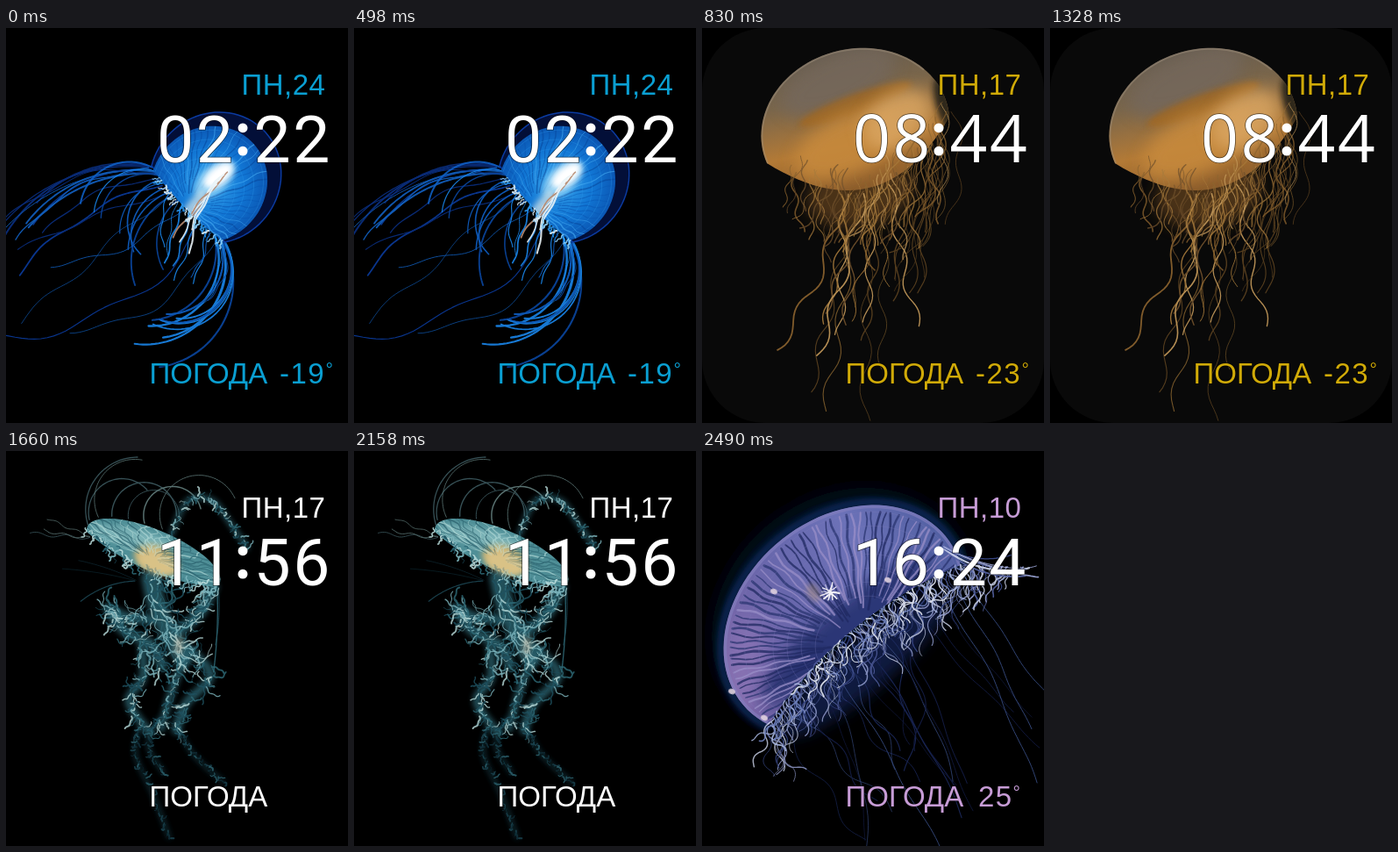
These frames come from a looping animation (390x450 px, 3320 ms). An HTML page:

```html
<!DOCTYPE html>
<html lang="ru">
<head>
<meta charset="utf-8">
<title>Watch faces</title>
<style>
html, body { margin: 0; width: 100%; height: 100%; overflow: hidden; background: #000; }
svg { display: block; width: 390px; height: 450px; }
text { stroke: #000; stroke-opacity: .6; stroke-width: 1.6px; paint-order: stroke; white-space: pre; }
.label { font: 33px "Liberation Sans", Arial, sans-serif; }
.degree { font-size: 21px; }
.time { font-size: 75px; letter-spacing: 2.5px; fill: #fff; }
.colon { font: 62px Roboto, sans-serif; fill: #fff; stroke: #fff; stroke-opacity: 1; stroke-width: 4px; text-anchor: middle; }
.lines { fill: none; stroke-linecap: round; stroke-linejoin: round; }
</style>
</head>
<body>
<svg id="stage" viewBox="0 0 390 450"></svg>
<script>
const STEP = 830, TAU = Math.PI * 2;
let seed = 11;
const rnd = () => (seed = (seed * 16807) % 2147483647) / 2147483647;
const jitter = a => (rnd() * 2 - 1) * a;
const mix = ([a, b], t) => a + (b - a) * t;
const pick = list => list[Math.floor(rnd() * list.length)];
const range = (n, f) => Array.from({ length: n }, (_, i) => f(n > 1 ? i / (n - 1) : .5));
const line = pts => 'M' + pts.map(p => p.map(v => v.toFixed(1)).join(' ')).join('L');
const stroke = (d, color, w) => `<path d="${d}" stroke="${color}" stroke-width="${w.toFixed(2)}"/>`;
const lines = (body, op = 1, extra = '') => `<g class="lines" opacity="${op}" ${extra}>${body}</g>`;
const fill = (d, color, extra = '') => `<path d="${d}" fill="${color}" ${extra}/>`;
const blob = (x, y, rx, ry, turn, color, op = 1, soft = 'soft') =>
  `<ellipse cx="${x}" cy="${y}" rx="${rx}" ry="${ry}" transform="rotate(${turn} ${x} ${y})" fill="${color}" opacity="${op}" filter="url(#${soft})"/>`;
const clip = (id, d, body) => `<clipPath id="${id}"><path d="${d}"/></clipPath><g clip-path="url(#${id})">${body}</g>`;

// Part of an ellipse standing on the chord x0,y0 - x1,y1; sag bends the open edge
function dome(x0, y0, x1, y1, bulge, depth, sag) {
  const len = Math.hypot(x1 - x0, y1 - y0), ux = (x1 - x0) / len, uy = (y1 - y0) / len;
  const mx = (x0 + x1) / 2, my = (y0 + y1) / 2;
  const s = Math.sqrt(1 - 1 / bulge ** 2), over = Math.asin(s);
  const rx = len / 2 * bulge, ry = depth / (1 + s);
  const place = (a, b) => [mx + ux * a + uy * b, my + uy * a - ux * b];
  const at = (p, k = 1) => {
    const a = Math.PI + over - p * (Math.PI + 2 * over);
    return place(k * rx * Math.cos(a), k * ry * (s + Math.sin(a)));
  };
  const rim = p => place(len * (p - .5), -sag * 4 * p * (1 - p));
  const path = line([...range(60, p => at(p)), ...range(30, p => rim(1 - p))]) + 'Z';
  return { at, rim, path };
}

// Ribs running from the crown edge toward the open edge
function ribs(bell, n, colors, w, [k0, k1], wave, op) {
  return lines(range(n, p => {
    const phase = rnd() * TAU, end = k1 + jitter(.1);
    const pts = range(14, t => bell.at(p + wave * Math.sin(t * 14 + phase), mix([k0, end], t)));
    return stroke(line(pts), pick(colors), w * (.6 + rnd() * .8));
  }).join(''), op);
}

const rings = (bell, n, color, w, op) => lines(range(n, k =>
  stroke(line(range(40, p => bell.at(p, .35 + .6 * k))), color, w)).join(''), op);

// A thread that walks ahead while its heading bends and swings (degrees)
function strand(x, y, turn, len, bend, curl = 0, waves = 2) {
  const phase = rnd() * TAU, step = len / 40;
  return line(range(41, t => {
    const a = (turn + bend * t + curl * Math.sin(waves * TAU * t + phase)) * TAU / 360;
    return [x += Math.cos(a) * step, y += Math.sin(a) * step];
  }));
}

// Threads along an edge; ranges blend from its first end to its last
function grow(edge, n, colors, { p = [0, 1], turn, len, bend = [0, 0], curl, waves, w = 1.3, loose = 8, lift = 0, op = .9 }) {
  return lines(range(n, q => {
    const [x, y] = edge(mix(p, q));
    const d = strand(x + jitter(2), y - rnd() * lift, mix(turn, q) + jitter(loose),
      mix(len, q) * (.75 + rnd() * .45), mix(bend, q) + jitter(loose * 2), curl, waves);
    return stroke(d, pick(colors), w * (.6 + rnd() * .8));
  }).join(''), op);
}

// Smooth walk through a few points
function through(pts) {
  return t => {
    const u = Math.min(t, .9999) * (pts.length - 1), i = Math.floor(u), f = u - i;
    const [a, b, c, d] = [-1, 0, 1, 2].map(k => pts[Math.max(0, Math.min(pts.length - 1, i + k))]);
    return [0, 1].map(j => b[j] + f * (c[j] - a[j]) / 2
      + f * f * (a[j] - 2.5 * b[j] + 2 * c[j] - d[j] / 2) + f ** 3 * (1.5 * (b[j] - c[j]) + (d[j] - a[j]) / 2));
  };
}

// Crumpled ribbon: a soft core with short curls around it
function frill(width, colors, ...pts) {
  const limb = through(pts), core = line(range(40, limb));
  const curls = range(pts.length * 11, t => {
    const [x, y] = limb(t), [x2, y2] = limb(t + .02);
    const along = Math.atan2(y2 - y, x2 - x) * 360 / TAU;
    const d = strand(x + jitter(width * .4), y + jitter(width * .3), along + jitter(70), width * (.7 + rnd()), jitter(170), 25);
    return stroke(d, pick(colors), .7 + rnd() * 1.3);
  }).join('');
  return lines(stroke(core, colors[0], width * .75), .75, 'filter="url(#soft)"') + lines(curls, .8);
}

function blueJelly() {
  const margin = dome(166, 157, 250, 244, 1.2, 120, 2), bell = dome(168, 162, 246, 242, 1.15, 103, 4);
  const blues = ['#0f5fc4', '#1a86ea', '#0a469f'], deep = ['#0b3b9c', '#0a2f80', '#1260c0'];
  return grow(margin.rim, 7, deep, { p: [0, .1], turn: [193, 185], len: [180, 190], bend: [-65, -55], w: 1.6, loose: 4 })
    + grow(margin.rim, 5, deep, { p: [.02, .3], turn: [188, 165], len: [170, 205], bend: [-70, -25], curl: 10 })
    + grow(margin.rim, 9, blues, { p: [.03, .4], turn: [195, 150], len: [105, 105], bend: [-130, -70], w: 1.5, loose: 14 })
    + grow(margin.rim, 4, deep, { p: [.3, .9], turn: [140, 115], len: [210, 265], bend: [15, 70], curl: 14, w: 1.1 })
    + grow(margin.rim, 10, blues, { p: [.85, 1], turn: [72, 58], len: [140, 185], bend: [100, 140], w: 1.9, loose: 6 })
    + grow(margin.rim, 9, blues, { p: [.3, .95], turn: [120, 70], len: [60, 85], bend: [-40, 80], curl: 15, w: 1.3 })
    + fill(margin.path, '#030f38', 'stroke="#0b3aa0" stroke-width="1.5"')
    + fill(bell.path, 'url(#blue)', 'filter="url(#fine)"')
    + clip('c0', bell.path, ribs(bell, 34, ['#49b0f5', '#07489d', '#0a58b4'], 1.2, [1, .25], .006, .6)
      + rings(bell, 6, '#2f9aea', .8, .4)
      + blob(238, 172, 28, 15, -42, '#a5dcf8', .75) + blob(242, 168, 20, 10, -38, '#fff')
      + blob(212, 205, 25, 7, -53, '#c4dae4', .8))
    + grow(p => [252 - 12 * p, 163 + 14 * p], 6, ['#b78a70', '#eaf4f8', '#7d858c'], { turn: [140, 135], len: [85, 75], bend: [-20, -25], curl: 12, w: 1.7 })
    + grow(bell.rim, 30, ['#8fd2f8', '#2b95ea', '#d8eefa'], { p: [.1, 1], turn: [135, 110], len: [9, 12], curl: 40, w: 1.6, loose: 40 });
}

function amberJelly() {
  const bell = dome(74, 154, 282, 101, 1.01, 104, 56);
  const tans = ['#a87b3c', '#71512c', '#c79c5c', '#8d642f'], dim = ['#5c4220', '#7d5c2c'];
  return '<rect width="390" height="450" rx="72" fill="#090909"/>'
    + blob(180, 190, 60, 36, -10, '#60401c', .75, 'wide')
    + grow(bell.rim, 5, dim, { p: [.4, .6], turn: [100, 95], len: [230, 240], curl: 26, waves: 3, w: 1 })
    + grow(bell.rim, 11, tans, { p: [.35, .6], turn: [98, 88], len: [185, 150], bend: [15, 0], curl: 28, waves: 2.5 })
    + grow(bell.rim, 14, dim, { p: [.7, 1], turn: [85, 80], len: [140, 150], bend: [20, 40], curl: 25, w: 1, lift: 10 })
    + fill(bell.path, 'url(#amber)', 'filter="url(#fine)"')
    + clip('c1', bell.path, blob(155, 62, 70, 31, -24, '#74685b', .85, 'wide')
      + blob(175, 87, 68, 12, -20, '#a5681b', .7)
      + blob(170, 131, 69, 33, -25, '#c78a3e', .85, 'wide')
      + blob(222, 104, 44, 29, -35, '#d9a562', .85, 'wide')
      + blob(276, 88, 9, 32, -15, '#1d1a16', .85))
    + lines(stroke(line(range(40, p => bell.at(p * .8, .99))), '#a0917c', 1.8), .45)
    + grow(bell.rim, 46, tans, { p: [.12, .98], turn: [95, 92], len: [70, 125], bend: [0, 20], curl: 32, w: 1.2, loose: 14, lift: 35, op: .75 });
}

function tealJelly() {
  const cap = dome(92, 92, 240, 155, 1.02, 34, 13);
  const teal = ['#2f6c79', '#7fb8c0', '#1f5261', '#b9dcdb'], dark = ['#1c4653', '#2f6875', '#12323d'], faint = ['#3d5a60', '#64807f'];
  return grow(cap.at, 7, faint, { p: [.05, .5], turn: [-105, -110], len: [125, 130], bend: [130, 190], w: 1.1, loose: 14 })
    + grow(() => [96, 98], 3, faint, { turn: [175, 205], len: [85, 60], curl: 20, w: 1 })
    + grow(() => [150, 148], 3, dark, { turn: [185, 200], len: [75, 75], bend: [-20, 0], w: 1 })
    + grow(() => [241, 148], 2, dark, { turn: [85, 88], len: [95, 90], bend: [15, 10], w: 1, loose: 2 })
    + frill(7, teal, [188, 96], [207, 57], [235, 56], [254, 80], [275, 110])
    + frill(5, dark, [152, 315], [148, 347], [168, 392], [186, 440])
    + frill(5, dark, [174, 305], [162, 335], [180, 367])
    + frill(5, dark, [193, 310], [214, 346], [248, 377])
    + frill(11, teal, [205, 235], [190, 270], [177, 316])
    + frill(13, teal, [205, 222], [233, 255], [205, 288], [194, 318])
    + frill(12, teal, [155, 222], [156, 258], [140, 285], [163, 320])
    + frill(15, teal, [120, 185], [135, 205], [165, 220], [178, 245])
    + frill(15, teal, [165, 192], [140, 190], [116, 179])
    + frill(17, teal, [236, 155], [222, 183], [198, 205])
    + frill(28, teal, [165, 145], [172, 175], [185, 205], [202, 236])
    + fill(cap.path, '#4f8f97', 'filter="url(#fine)"')
    + clip('c2', cap.path, blob(146, 99, 48, 10, 13, '#86bcbf', .8)
      + blob(172, 124, 27, 16, 20, '#d3b776', .95)
      + ribs(cap, 40, ['#b9dfdc', '#2c6470', '#1f5260'], 1.2, [1, .2], .02, .6))
    + grow(cap.rim, 50, teal, { turn: [60, 110], len: [14, 20], curl: 50, w: 1.4, loose: 50, lift: 8 })
    + blob(172, 128, 22, 12, 22, '#dfc88d', .7) + blob(197, 222, 4, 11, 10, '#b5a58d', .6);
}

function violetJelly() {
  const bell = dome(76, 312, 295, 130, 1.055, 153, -22), halo = dome(72, 316, 306, 126, 1.06, 178, -20);
  const pale = ['#9ca6d8', '#5663a4', '#ced5ec', '#3c4c8e'], trail = ['#1b285a', '#384d83', '#141d45'];
  const tail = p => [290 + 78 * p, 128 + 4 * p];
  return fill(halo.path, '#040b1c', 'filter="url(#wide)"')
    + lines(stroke(line(range(50, p => bell.at(p, 1.02))), '#0f2a5e', 9), .8, 'filter="url(#soft)"')
    + blob(185, 245, 120, 28, -40, '#13265c', .7, 'wide')
    + grow(bell.rim, 15, trail, { p: [.25, 1], turn: [52, 58], len: [220, 230], bend: [20, 0], curl: 6, w: 1 })
    + grow(bell.rim, 9, trail, { p: [.05, .7], turn: [55, 65], len: [150, 170], bend: [-20, 20], curl: 25, w: 1 })
    + fill(bell.path, 'url(#violet)', 'filter="url(#fine)"')
    + clip('c3', bell.path, blob(165, 205, 125, 30, -40, '#1b2a68', .8, 'wide')
      + blob(48, 243, 22, 55, 7, '#8f78b8', .6, 'wide')
      + ribs(bell, 64, ['#1f2860', '#2a3570', '#9a8fc8'], 2.1, [.95, .3], .004, .75)
      + rings(bell, 7, '#7f7dbb', .9, .3)
      + lines(stroke(line(range(50, p => bell.at(p, .99))), '#8581c0', 4), .6, 'filter="url(#fine)"'))
    + grow(bell.rim, 85, pale, { turn: [88, 62], len: [75, 70], bend: [0, 50], curl: 42, waves: 1.7, w: 1.1, loose: 22, op: .8 })
    + grow(bell.rim, 55, ['#e7ebf5', '#a6b4dd', '#6f82be'], { turn: [70, 60], len: [38, 42], bend: [30, 60], curl: 50, waves: 1.3, w: 1.3, loose: 30 })
    + grow(tail, 26, pale, { turn: [80, 95], len: [65, 14], bend: [40, 60], curl: 35, w: 1.2, loose: 18 })
    + grow(() => [272, 108], 7, pale, { turn: [45, 25], len: [100, 100], bend: [-60, -20], w: 1.6, loose: 5 })
    + grow(() => [146, 161], 14, ['#f1eff6'], { turn: [0, 360], len: [10, 10], w: 1.5, op: 1 })
    + blob(127, 161, 7, 11, -25, '#98816f', .5)
    + [[82, 160], [34, 274], [71, 304], [212, 147]].map(([x, y]) => blob(x, y, 4, 3, 20, '#e2d3e0', .9, 'fine')).join('');
}

const faces = [
  { draw: blueJelly, day: '24', h: '02', m: '22', temp: '-19', color: '#0a9fd2', font: 'Roboto' },
  { draw: amberJelly, day: '17', h: '08', m: '44', temp: '-23', color: '#d0aa08', font: 'Open Sans' },
  { draw: tealJelly, day: '17', h: '11', m: '56', temp: '', color: '#fff', font: 'Roboto' },
  { draw: violetJelly, day: '10', h: '16', m: '24', temp: '25', color: '#c79cd6', font: 'Roboto' }
];

function labels({ day, h, m, temp, color, font }) {
  const shift = temp[0] === '-' ? 0 : -10;
  const put = (x, y, s, gap, cls = '') => `<text class="label ${cls}" x="${x}" y="${y}" fill="${color}" letter-spacing="${gap}">${s}</text>`;
  const big = (x, s) => `<text class="time" x="${x}" y="153" font-family="'${font}', sans-serif">${s}</text>`;
  return put(268.5, 76, 'ПН,' + day, .5) + put(163.5, 405, 'ПОГОДА', 0)
    + (temp && put(shift ? 315 : 312, 405, temp, 1.4) + put(364.5 + shift, 396, '°', 0, 'degree'))
    + big(172, h) + big(282.5, m) + '<text class="colon" x="270" y="143">:</text>';
}

const stops = list => list.map((c, i) => `<stop offset="${i / (list.length - 1)}" stop-color="${c}"/>`).join('');
const blur = (id, r) => `<filter id="${id}" x="-50%" y="-50%" width="200%" height="200%"><feGaussianBlur stdDeviation="${r}"/></filter>`;

const stage = document.getElementById('stage');
stage.innerHTML = '<defs>' + blur('fine', .7) + blur('soft', 3) + blur('wide', 9)
  + `<radialGradient id="blue" cx=".5" cy=".5" r=".6">${stops(['#3aa8ee', '#1176d4', '#0848a4'])}</radialGradient>`
  + `<linearGradient id="amber" x1=".3" y1="0" x2=".6" y2="1">${stops(['#625a50', '#7a664b', '#b37a36', '#87592a'])}</linearGradient>`
  + `<linearGradient id="violet" x1="0" y1=".7" x2="1" y2=".2">${stops(['#7a66a8', '#6867ac', '#6c72b8', '#4f5ea0'])}</linearGradient></defs>`
  + '<rect width="390" height="450"/>'
  + faces.map(f => `<g class="face" display="none">${f.draw()}${labels(f)}</g>`).join('');

const groups = [...stage.querySelectorAll('.face')];
let shown = -1;

function render(t) {
  const now = Math.floor(t / STEP) % faces.length;
  if (now === shown) return;
  shown = now;
  groups.forEach((g, i) => g.setAttribute('display', i === now ? 'inline' : 'none'));
}

const start = performance.now();
function tick() {
  render(performance.now() - start);
  requestAnimationFrame(tick);
}
tick();
</script>
</body>
</html>
```
